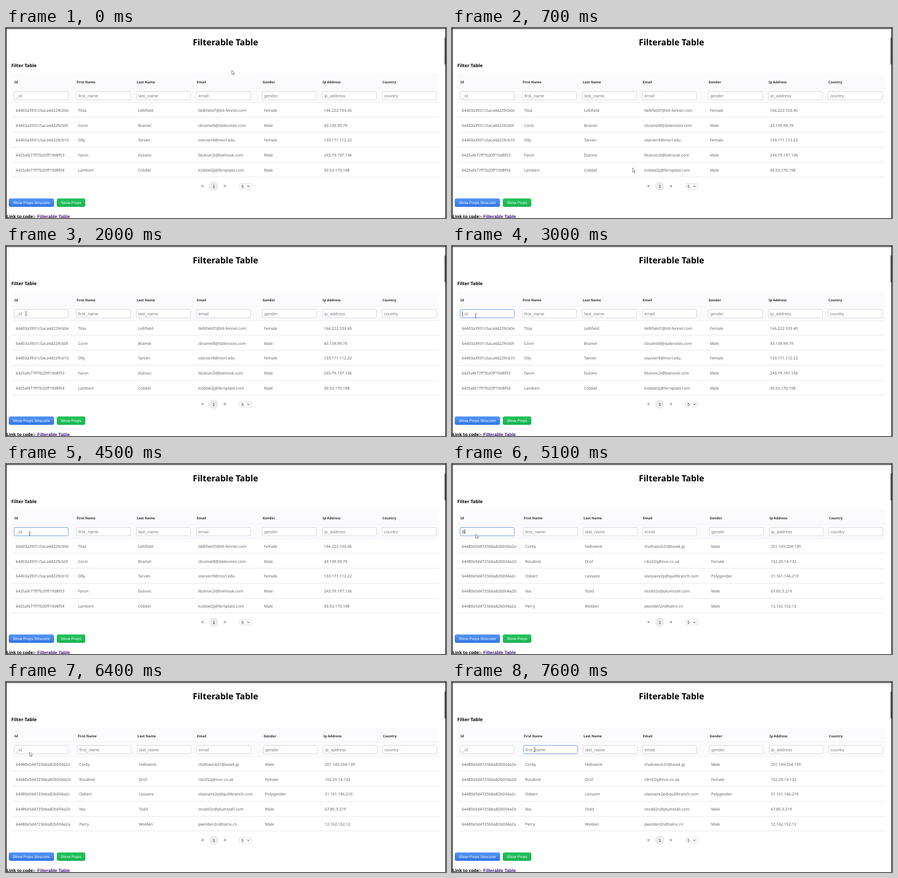
Recreate the animation shown at these times as an HTML page. Size 788x340 px, loop 8 s.

```html
<!DOCTYPE html>
<html lang="en">
<head>
<meta charset="utf-8">
<title>Filterable Table</title>
<style>
  html, body { margin: 0; width: 100%; height: 100%; overflow: hidden; background: #fff; }
  svg { display: block; width: 788px; height: 340px; }
  text { font-family: "Noto Sans", "Open Sans", sans-serif; text-rendering: geometricPrecision; white-space: pre; }
  .title { font-size: 15.3px; font-weight: 700; text-anchor: middle; }
  .sub { font-size: 8.2px; font-weight: 700; }
  .head { font-size: 6.15px; font-weight: 700; fill: #303036; }
  .cell { font-size: 7.04px; fill: #62626a; }
  .hint, .value { font-family: "Liberation Sans", Arial, sans-serif; font-size: 7.7px; fill: #7f7f7f; }
  .value { fill: #333; }
  .page { font-family: "Liberation Sans", Arial, sans-serif; font-size: 7.6px; fill: #333; text-anchor: middle; }
  .arrow { font-size: 9px; font-weight: 500; fill: #333; text-anchor: middle; }
  .button { font-family: "Liberation Sans", Arial, sans-serif; font-size: 6.85px; fill: #fff; }
  .label { font-size: 7.8px; font-weight: 700; }
  .link { font-family: "Liberation Sans", Arial, sans-serif; font-size: 8.05px; font-weight: 700; fill: #3f1678; }
</style>
</head>
<body>
<svg viewBox="0 0 788 340">
  <defs>
    <linearGradient id="blue" x2="0" y2="1"><stop stop-color="#5596f5"/><stop offset="1" stop-color="#3274e6"/></linearGradient>
    <linearGradient id="green" x2="0" y2="1"><stop stop-color="#22c45c"/><stop offset="1" stop-color="#19b350"/></linearGradient>
  </defs>
  <rect width="788" height="340" fill="#fff"/>
  <g id="page"></g>
  <rect x="785" y="1" width="2" height="339" fill="#f3f3f3"/>
  <rect x="785" y="17" width="2" height="48" fill="#858589"/>
  <rect x="0" y="2" width="785" height="1" fill="#b5b5b5"/>
  <rect x=".5" y=".5" width="787" height="341" fill="none" stroke="#000"/>
  <g id="pointer">
    <path id="arrow" d="M0 0V7.6L1.7 6.1 2.9 8.8 4 8.3 2.8 5.7 5 5.5Z" fill="#fff" stroke="#6c6c6c" stroke-width=".8"/>
    <path id="beam" d="M-1.5-3.5H-.4L0-3.1.4-3.5H1.5M0-3.1V3.1M-1.5 3.5H-.4L0 3.1.4 3.5H1.5" fill="none" stroke="#444" stroke-width=".8"/>
  </g>
</svg>
<script>
const LOOP = 8000, TICK = 100;
const heads = ["Id", "First Name", "Last Name", "Email", "Gender", "Ip Address", "Country"];
const hints = ["_id", "first_name", "last_name", "email", "gender", "ip_address", "country"];

const tables = {
  all: {
    cols: [15, 126.5, 234, 341.5, 459.5, 567, 674],
    rows: [
      ["64403a3931c5aca4d229cb0e", "Tilsa", "Lellifield", "tlellifield7@tilt-fennel.com", "Female", "166.222.103.45"],
      ["64403a3931c5aca4d229cb0f", "Corin", "Bramel", "cbramel8@dalenotes.com", "Male", "43.139.99.79"],
      ["64403a3931c5aca4d229cb10", "Olly", "Tarven", "otarven9@morl.edu", "Female", "133.171.112.22"],
      ["6425afe77ff7b20ff19d8f53", "Faron", "Dulovic", "fdulovic2i@belnook.com", "Male", "243.79.197.136"],
      ["6425afe77ff7b20ff19d8f54", "Lambert", "Cobbel", "lcobbel2j@fernplate.com", "Male", "30.53.170.198"]
    ]
  },
  some: {
    cols: [15, 128.5, 235.5, 342, 461.5, 568.5, 675],
    rows: [
      ["64480e5d4725bba82b004a2e", "Corby", "Hallowick", "challowick2r@tavek.jp", "Male", "201.149.204.139"],
      ["64480e5d4725bba82b004a2d", "Rosalind", "Drof", "rdrof2q@nvo.co.uk", "Female", "152.29.14.132"],
      ["64480e5d4725bba82b004a2c", "Osbert", "Lassaire", "olassaire2p@quillbranch.com", "Polygender", "31.161.146.210"],
      ["64480e5d4725bba82b004a2b", "Nia", "Todd", "ntodd2o@plumstall.com", "Male", "67.85.3.219"],
      ["64480e5d4725bba82b004a2a", "Perry", "Wolden", "pwolden2n@talrix.cn", "Male", "12.162.152.12"]
    ]
  },
  one: {
    cols: [15, 122, 229.5, 336.5, 460.5, 567.5, 675],
    rows: [["6425afe77ff7b20ff19d8f55", "Irena", "MacOrvin", "imacorvin2k@wanderquill.com", "Female", "43.160.205.161"]]
  }
};

// Each step: start time, then the state from there on
const filterSteps = [[0, "all", ""], [4700, "some", "5"], [5200, "one", "55"], [6300, "some", ""]];
const focusSteps = [[0, -1], [2900, 0], [5200, -1], [7000, 1]];
const caretSteps = [[0, 0], [2900, 1], [3400, 0], [4000, 1], [4500, 0], [4700, 1], [5200, 0], [7000, 1], [7600, 0]];
const beamSteps = [[0, 0], [1900, 1], [4700, 0], [7000, 1]];
const path = [
  [0, 404.5, 75.5], [900, 300, 300], [1100, 5, 176], [1300, 5, 176], [1700, 5.3, 149],
  [2000, 36, 121], [2200, 36, 121], [2900, 42.5, 125], [6800, 42.5, 125], [7100, 148, 121], [LOOP, 148, 121]
];

const $ = id => document.getElementById(id);
const at = (steps, t) => steps.findLast(s => s[0] <= t).slice(1);
const text = (cls, x, y, s) => `<text class="${cls}" x="${x}" y="${y}">${s}</text>`;
const rect = (x, y, w, h, fill, extra = "") => `<rect x="${x}" y="${y}" width="${w}" height="${h}" fill="${fill}" ${extra}/>`;
const line = (y, color, x = 9, w = 767) => rect(x, y, w, 1, color);

function input(x, y, hint, value, focused, caret) {
  const border = focused ? "#78a4e8" : "#dadade";
  const end = x + 3.5 + value.length * 4.28;
  return rect(x - .5, y - 7.5, 97, 15, "#fff", `rx="2" stroke="${border}" stroke-width="1"`)
    + text(value ? "value" : "hint", x + 3, y + 2.6, value || hint)
    + (caret ? rect(end - .2, y - 4, .9, 8.5, "#222") : "");
}

function footer(y) {
  return text("arrow", 352, y + 3.2, "&lt;")
    + `<circle cx="372" cy="${y}" r="8.2" fill="#ebebeb"/>` + text("page", 372, y + 2.7, "1")
    + text("arrow", 392, y + 3.2, "&gt;")
    + rect(418.5, y - 5, 21, 10, "#fff", 'rx="1.5" stroke="#d8d8d8" stroke-width=".8"')
    + text("page", 423.5, y + 2.7, "5")
    + `<path d="M432 ${y - 1}l2.2 2.2 2.2-2.2" fill="none" stroke="#333"/>`
    + rect(5, y + 22, 81, 15, "url(#blue)", 'rx="3"') + text("button", 12, y + 31.8, "Show Props Strucutre")
    + rect(91, y + 22, 51, 15, "url(#green)", 'rx="3"') + text("button", 98, y + 31.8, "Show Props")
    + text("label", 1, y + 56.6, "Link to code:-") + text("link", 56, y + 56.6, "Filterable Table");
}

function page(name, value, focus, caret) {
  const { cols, rows } = tables[name];
  const single = rows.length === 1;
  const headH = single ? 34 : 25.7, rowH = single ? 35.3 : 26.75;
  const split = 82 + headH, top = single ? 150 : 133.6;
  const inputY = single ? 133.4 : 121;
  let out = text("title", 393, 31.3, "Filterable Table") + text("sub", 9.5, 69.5, "Filter Table")
    + rect(9, 82, 767, top - 82, "#fbfafd") + line(Math.round(split) - 1, "#f3f2f6") + line(Math.round(top) - 1, "#f0eff3");
  cols.forEach((x, i) => {
    out += text("head", x, (single ? 100 : 96) + 2.7, heads[i])
      + input(x, inputY, hints[i], i ? "" : value, i === focus, caret && i === focus);
  });
  rows.forEach((row, r) => {
    const y = top + rowH * (r + .5) + .5;
    row.forEach((s, i) => { out += text("cell", cols[i] + 2.4, y + 2.4, s); });
    out += line(Math.round(top + rowH * (r + 1)) - 1, "#e9e9eb");
  });
  out += footer(single ? 201 : 283);
  if (single) out += line(312, "#a9a9a9", 1, 784) + text("title", 393, 341.3, "Editable Table");
  return out;
}

function pointer(t) {
  const i = path.findIndex(p => p[0] > t);
  const [t0, x0, y0] = path[i - 1], [t1, x1, y1] = path[i];
  const k = (t - t0) / (t1 - t0);
  $("pointer").setAttribute("transform", `translate(${x0 + (x1 - x0) * k} ${y0 + (y1 - y0) * k})`);
  const [beam] = at(beamSteps, t);
  $("beam").style.display = beam ? "" : "none";
  $("arrow").style.display = beam ? "none" : "";
}

let shown = "";
function draw(now) {
  const t = Math.floor((now % LOOP) / TICK) * TICK;
  const state = [...at(filterSteps, t), ...at(focusSteps, t), ...at(caretSteps, t)];
  const key = state.join();
  if (key !== shown) {
    $("page").innerHTML = page(...state);
    shown = key;
  }
  pointer(t);
}

const start = performance.now();
function loop() {
  draw(performance.now() - start);
  requestAnimationFrame(loop);
}
loop();
</script>
</body>
</html>
```
